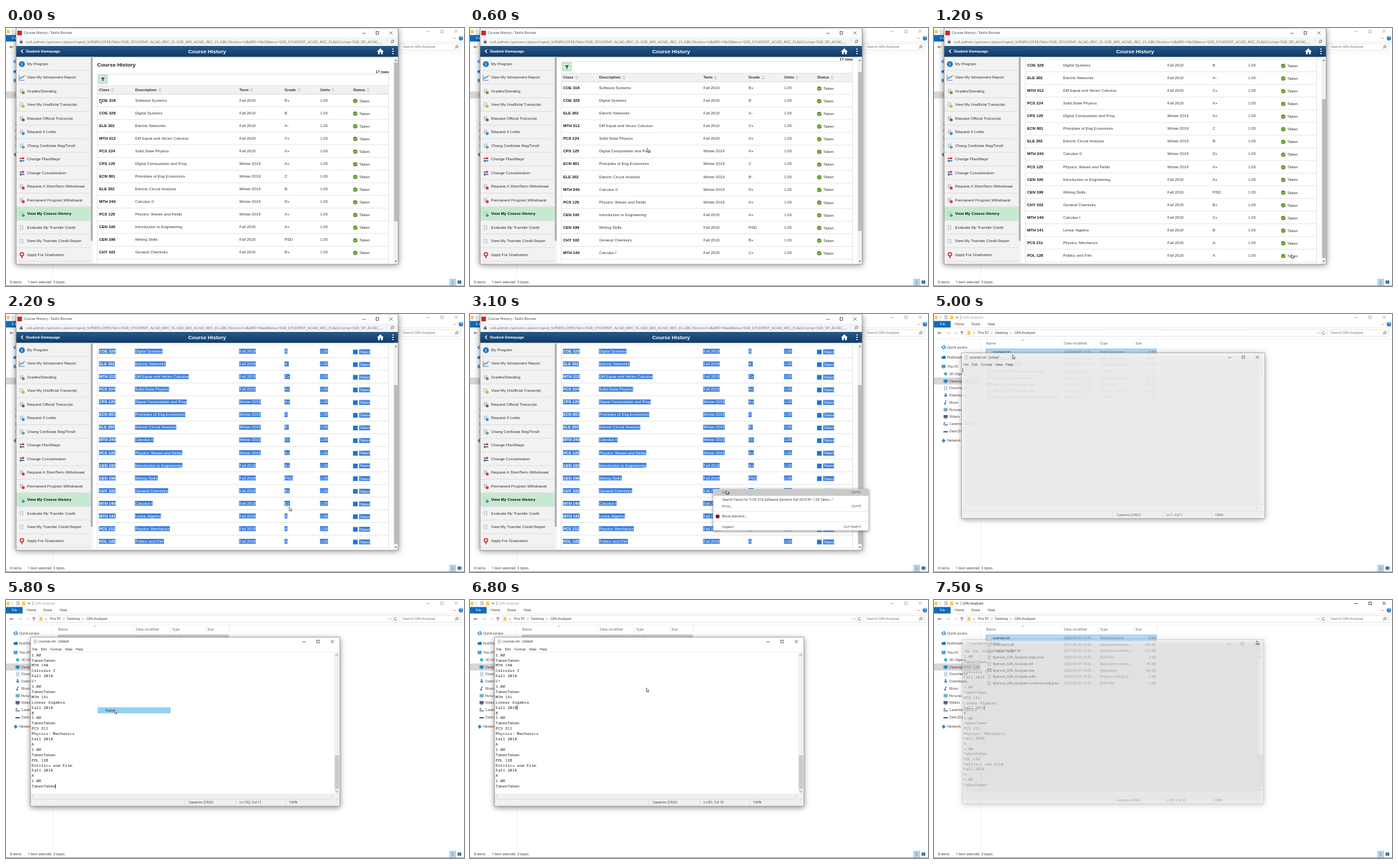
Recreate the animation shown at these times as an HTML page with a canvas. Size 690 px wide and 388 px high, loop 7600 ms.

```html
<!DOCTYPE html>
<html lang="en">
<head>
<meta charset="utf-8">
<title>Course export</title>
<style>
html, body { margin: 0; width: 100%; height: 100%; overflow: hidden; background: #fff; }
canvas { display: block; width: 690px; height: 388px; }
</style>
</head>
<body>
<canvas id="stage" width="690" height="388"></canvas>
<script>
const g = document.getElementById('stage').getContext('2d');
const LOOP = 7600, STEP = 100;
const UI = '"Open Sans", "Noto Sans", sans-serif';
const ARIAL = '"Liberation Sans", Arial, sans-serif';
const MONO = '"Noto Sans Mono", "DejaVu Sans Mono", monospace';

const courses = [
  'COE 318|Software Systems|Fall 2019|B+', 'COE 328|Digital Systems|Fall 2019|B',
  'ELE 302|Electric Networks|Fall 2019|A-', 'MTH 312|Diff Equat and Vector Calculus|Fall 2019|C+',
  'PCS 224|Solid State Physics|Fall 2019|A+', 'CPS 125|Digital Computation and Prog|Winter 2019|A+',
  'ECN 801|Principles of Eng Economics|Winter 2019|C', 'ELE 202|Electric Circuit Analysis|Winter 2019|B-',
  'MTH 240|Calculus II|Winter 2019|D+', 'PCS 125|Physics: Waves and Fields|Winter 2019|A+',
  'CEN 100|Introduction to Engineering|Fall 2018|A+', 'CEN 199|Writing Skills|Fall 2018|PSD',
  'CHY 102|General Chemistry|Fall 2018|B+', 'MTH 140|Calculus I|Fall 2018|C+',
  'MTH 141|Linear Algebra|Fall 2018|B', 'PCS 211|Physics: Mechanics|Fall 2018|A',
  'POL 128|Politics and Film|Fall 2018|A'
].map(s => s.split('|'));
const pasted = courses.flatMap(c => [...c, '1.00', 'TakenTaken']);

const clamp = v => Math.max(0, Math.min(1, v));
const ease = v => { v = clamp(v); return v * v * (3 - 2 * v); };
const span = (t, a, b) => ease((t - a) / (b - a));

function box(x, y, w, h, fill, stroke) {
  if (fill) { g.fillStyle = fill; g.fillRect(x, y, w, h); }
  if (stroke) {
    g.strokeStyle = stroke; g.lineWidth = 0.7;
    g.strokeRect(x + 0.35, y + 0.35, w - 0.7, h - 0.7);
  }
}
function disc(x, y, r, color) {
  g.fillStyle = color; g.beginPath(); g.arc(x, y, r, 0, 7); g.fill();
}
function line(points, color, width = 0.7) {
  g.strokeStyle = color; g.lineWidth = width;
  g.beginPath();
  for (let i = 0; i < points.length; i += 2) g.lineTo(points[i], points[i + 1]);
  g.stroke();
}
function shape(points, fill) {
  g.fillStyle = fill; g.beginPath();
  for (let i = 0; i < points.length; i += 2) g.lineTo(points[i], points[i + 1]);
  g.closePath(); g.fill();
}
// y is the middle of the capitals
function text(s, x, y, size = 5.1, color = '#333', family = UI, weight = '', align = 'left') {
  g.font = `${weight} ${size}px ${family}`;
  g.textAlign = align; g.fillStyle = color;
  g.fillText(s, x, y + size * 0.35);
}
function chevron(x, y, dx, dy, color = '#777') {
  if (dx) line([x - dx, y - 2, x + dx, y, x - dx, y + 2], color);
  else line([x - 2, y - dy, x, y + dy, x + 2, y - dy], color);
}
function lens(x, y, color) {
  g.strokeStyle = color; g.lineWidth = 0.8;
  g.beginPath(); g.arc(x + 0.6, y - 0.6, 1.8, 0, 7); g.stroke();
  line([x - 0.8, y + 0.8, x - 2.4, y + 2.4], color, 0.9);
}
function controls(xMin, xMax, xClose, y, color) {
  line([xMin - 2.5, y + 0.5, xMin + 2.5, y + 0.5], color);
  box(xMax - 2.3, y - 2.3, 4.6, 4.6, null, color);
  line([xClose - 2.3, y - 2.3, xClose + 2.3, y + 2.3], color);
  line([xClose - 2.3, y + 2.3, xClose + 2.3, y - 2.3], color);
}
function shadowBox(x, y, w, h, fill, blur, color) {
  g.save();
  g.shadowBlur = blur; g.shadowColor = color; g.shadowOffsetY = blur / 5;
  box(x, y, w, h, fill);
  g.restore();
}
function page(x, y, accent) {
  box(x - 2.3, y - 3, 4.8, 6, '#fff', '#a3a9b0');
  line([x - 1, y - 1, x + 1.3, y - 1], accent);
  line([x - 1, y + 0.8, x + 1.3, y + 0.8], accent);
}

const places = [
  ['Quick access', 20, 50, '#2b8be0'], ['NubStash', 20, 65, '#1479d0'], ['This PC', 20, 79, '#3a9be0'],
  ['3D Objects', 23, 90, '#35b4d2'], ['Desktop', 23, 101, '#1e88d8'], ['Documents', 23, 111.5, '#8a9cae'],
  ['Downloads', 23, 122, '#2f7fe0'], ['Music', 23, 133, '#2390e8'], ['Pictures', 23, 144, '#6fa8c8'],
  ['Videos', 23, 154.5, '#555b66'], ['Casemor-SSD (C:)', 23, 165.5, '#8c9299'],
  ['Data (D:)', 23, 176, '#666'], ['Network', 20, 190.5, '#2b90d8']
];
const files = [
  ['courses.txt', '2020-05-07 11:41 ...', 'Text Document', '0 KB'],
  ['LiveCharts.dll', '2017-06-20 12:26 ...', 'Application extens...', '149 KB'],
  ['LiveCharts.Wpf.dll', '2017-06-20 12:26 ...', 'Application extens...', '213 KB'],
  ['Ryerson_GPA_Analyzer.deps.json', '2020-05-07 10:42 ...', 'JSON File', '2 KB'],
  ['Ryerson_GPA_Analyzer.dll', '2020-05-07 10:42 ...', 'Application extens...', '85 KB'],
  ['Ryerson_GPA_Analyzer.exe', '2020-05-07 10:42 ...', 'Application', '168 KB'],
  ['Ryerson_GPA_Analyzer.pdb', '2020-05-07 10:42 ...', 'Program Debug D...', '6 KB'],
  ['Ryerson_GPA_Analyzer.runtimeconfig.json', '2020-05-07 10:41 ...', 'JSON File', '1 KB']
];

function placeIcon(i, x, y, c) {
  if (i === 1) { disc(x - 1.4, y + 0.5, 1.9, c); disc(x + 1, y, 2.3, c); box(x - 2, y, 5, 2.3, c); }
  else if (i === 0) line([x - 3, y, x + 1, y - 2.5, x + 3, y + 1, x - 1, y + 2, x - 3, y], c, 1.4);
  else if (i === 6) { box(x - 1, y - 3, 2, 3, c); shape([x - 3, y, x + 3, y, x, y + 3], c); }
  else if (i === 7) { disc(x - 1, y + 1.8, 1.5, c); line([x, y + 2, x, y - 3, x + 2, y - 1], c, 1); }
  else if (i === 5) page(x, y, c);
  else if (i === 10 || i === 11) { box(x - 3.2, y, 6.4, 2.2, c); if (i === 10) box(x - 3, y - 3, 2.4, 2.4, '#35a4e8'); }
  else if (i === 3 || i === 12) shape([x, y - 3.2, x + 3, y, x, y + 3.2, x - 3, y], c);
  else { box(x - 3, y - 2.5, 6, 4.4, c); line([x - 1.6, y + 2.8, x + 1.6, y + 2.8], c); }
}

function explorer(t) {
  const active = t >= 7400 || (t >= 4700 && t < 4900);
  const ink = active ? '#111' : '#999';
  box(0, 0, 690, 388, '#fff');
  box(1, 2.5, 4.5, 5.5, '#f5cb5c');
  line([9.5, 2, 9.5, 8], '#aaa');
  page(18, 5, '#d05050');
  box(24, 2.5, 5, 5.5, '#f5cb5c');
  shape([33, 4.5, 36.4, 4.5, 34.7, 6.5], '#444');
  line([40.5, 2, 40.5, 8], '#888');
  text('GPA-Analyzer', 43, 5, 5.1, ink);
  controls(636, 657, 678, 5, ink);
  box(0, 10.5, 25, 10, '#0d6cbd');
  text('File', 8.5, 15.5, 5.1, '#fff');
  text('Home', 31, 15.5); text('Share', 56, 15.5); text('View', 81, 15.5);
  chevron(676, 15.5, 0, 1);
  disc(685.3, 15.5, 3.2, '#1679cf');
  text('?', 685.3, 15.5, 4.8, '#fff', UI, 'bold', 'center');
  line([0, 20.8, 690, 20.8], '#e2e2e2');

  line([11, 28.5, 6, 28.5], '#333'); line([8, 26.5, 6, 28.5, 8, 30.5], '#333');
  line([19, 28.5, 24, 28.5], '#bbb'); line([22, 26.5, 24, 28.5, 22, 30.5], '#bbb');
  chevron(33, 28.5, 0, 1, '#999');
  line([42, 31, 42, 26], '#333'); line([40, 28, 42, 26, 44, 28], '#333');
  box(48, 23, 545, 11, null, '#dcdcdc');
  box(50.5, 25.5, 4.5, 6, '#f5cb5c');
  chevron(60, 28.5, 0.8, 0); text('This PC', 65.5, 28.5);
  chevron(87, 28.5, 0.8, 0); text('Desktop', 92, 28.5);
  chevron(116, 28.5, 0.8, 0); text('GPA-Analyzer', 121, 28.5, 5.2);
  chevron(579, 28.5, 0, 1);
  line([582.7, 23, 582.7, 34], '#dcdcdc');
  g.strokeStyle = '#555'; g.lineWidth = 0.7;
  g.beginPath(); g.arc(587, 28.5, 2.2, 0, 5.2); g.stroke();
  box(595, 23, 91, 11, null, '#dcdcdc');
  text('Search GPA-Analyzer', 598, 28.5, 5.1, '#707070');
  lens(679, 28.5, '#555');
  line([0, 37.5, 690, 37.5], '#eee');

  box(0, 95.5, 69.5, 10.5, '#d6d6d6');
  places.forEach(([name, x, y, c], i) => {
    placeIcon(i, x === 20 ? 14.5 : 17.5, y, c);
    text(name, x, y);
  });
  line([70.5, 38, 70.5, 376], '#ececec');

  chevron(134, 39.5, 0, -0.7, '#999');
  [['Name', 78.5], ['Date modified', 196], ['Type', 250], ['Size', 303.5]]
    .forEach(([s, x]) => text(s, x, 44, 5.2, '#4c607a'));
  [193, 247, 301, 336].forEach(x => line([x, 39, x, 49], '#e3e3e3'));
  const hot = t >= 4700 && t < 5100 || t >= 7400;
  box(78, 52.3, 257.5, 9.7, hot ? '#b5dcfa' : '#d3d3d3', hot ? '#7fbdea' : '#c4c4c4');
  files.forEach(([name, date, type, size], i) => {
    const y = 57.3 + i * 9.7;
    if (i === 5) { box(80, y - 2.5, 6.5, 5, '#2d79bd'); box(81, y - 0.8, 4.5, 2.3, '#e8f2fa'); }
    else page(83, y, i === 3 || i === 7 ? '#2d8ad0' : '#9fb3c6');
    text(name, 88.5, y, 5.05, '#222');
    text(date, 196, y, 5.1, '#777');
    text(type, 250, y, 5.1, '#777');
    text(size, 334, y, 5.1, '#777', UI, '', 'right');
  });

  text('8 items', 6, 382.3); text('1 item selected', 32.5, 382.3); text('0 bytes', 71.5, 382.3);
  box(668, 377.5, 10, 9.5, '#cbe6f8', '#7db8e0');
  for (let i = 0; i < 3; i++) line([670.5, 380 + i * 2.2, 675.5, 380 + i * 2.2], '#567');
  box(680.5, 379.8, 5.5, 4.6, '#3d7fb5', '#567');
  line([0, 387.6, 690, 387.6], '#777');
}

const links = ['My Program', 'View My Advisement Report', 'Grades/Standing', 'View My Unofficial Transcript',
  'Request Official Transcript', 'Request A Letter', 'Chang Certficate Reg/Trnsfr', 'Change Plan/Major',
  'Change Concentration', 'Request A ShortTerm Withdrawal', 'Permanent Program Withdrawal',
  'View My Course History', 'Evaluate My Transfer Credit', 'View My Transfer Credit Report',
  'Apply For Graduation'];
const tints = ['#1d78bf', '#3b82c4', '#5f9f3a', '#e2a92c', '#4a6f9a', '#2f8fd0', '#7a9a86', '', '',
  '#c8403a', '#c8403a', '#3a9c98', '#b5bcc4', '#b5bcc4', '#c9352c'];

function linkIcon(i, y) {
  const x = 24, c = tints[i];
  if (i === 0) {
    disc(x, y, 4.4, c);
    text('i', x, y, 6.5, '#fff', ARIAL, 'bold', 'center');
  } else if (i === 1) {
    line([x - 4, y - 4, x - 4, y + 4, x + 4, y + 4], '#667', 0.8);
    line([x - 3, y + 2, x - 1, y - 1, x + 1, y, x + 4, y - 4], c, 1.2);
  } else if (i === 7 || i === 8) {
    box(x - 3.5, y - 2.5, 5, 1.6, '#c9352c'); shape([x + 1, y - 4, x + 4, y - 1.7, x + 1, y + 0.4], '#c9352c');
    box(x - 1.5, y + 1.2, 5, 1.6, '#2d70b8'); shape([x - 1, y - 0.2, x - 4, y + 2, x - 1, y + 4.2], '#2d70b8');
  } else if (i === 14) {
    g.strokeStyle = c; g.lineWidth = 1.6;
    g.beginPath(); g.arc(x, y - 1, 2.6, 0, 7); g.stroke();
    box(x - 0.8, y + 2, 1.6, 3, c);
  } else {
    page(x - 0.8, y - 0.5, c);
    if (i < 12) disc(x + 2, y + 2, 2.2, c);
  }
}

function courseTable(scroll, selected) {
  g.save();
  g.beginPath(); g.rect(131, 43.5, 453, 310.5); g.clip();
  g.translate(0, -scroll);
  text('Course History', 137.3, 55, 8.1, '#222', ARIAL, 'bold');
  text('17 rows', 577, 66, 5.4, '#222', ARIAL, 'bold', 'right');
  box(137, 69, 440, 360, null, '#d9d9d9');
  box(139, 70.5, 14, 13, '#cdebd6', '#9ccbad');
  shape([143, 74.8, 149, 74.8, 146.6, 77.5, 146.6, 80.5, 145.4, 79.8, 145.4, 77.5], '#333');
  box(137.5, 86.5, 439, 13, '#f1f1f1');
  line([137, 86.5, 577, 86.5], '#ddd');
  [['Class', 140, 160.5], ['Description', 194.5, 232], ['Term', 351.5, 370], ['Grade', 419.5, 441.5],
    ['Units', 473.5, 492.5], ['Status', 523, 545.5]].forEach(([s, x, d]) => {
    text(s, x, 93, 5.9, '#333', ARIAL, 'bold');
    line([d - 1.8, 92.6, d, 90.6, d + 1.8, 92.6], '#888', 0.6);
    line([d - 1.8, 93.6, d, 95.6, d + 1.8, 93.6], '#888', 0.6);
  });
  line([137, 99.5, 577, 99.5], '#cfcfcf');
  courses.forEach((c, i) => {
    const y = 108.6 + i * 19.06;
    const cell = (s, x, weight, dy = 0) => {
      const size = weight ? 6.05 : 5.95;
      if (selected) {
        g.font = `${weight} ${size}px ${ARIAL}`;
        box(x - 0.3, y - 3.7 + dy, g.measureText(s).width + 0.6, 7.4, '#3b7edb');
      }
      text(s, x, y + dy, size, selected ? '#fff' : weight ? '#111' : '#3a3a3a', ARIAL, weight);
    };
    cell(c[0], 140.2, 'bold');
    cell(c[1], 194.5, '');
    cell(c[2], 351.5, '');
    cell(c[3], 419.8, '');
    cell('1.00', 473.3, '');
    if (selected) box(522.8, y - 2.4, 7, 7, '#1f74cf');
    else {
      disc(526.2, y + 1, 3.2, '#5c8f1d');
      line([524.6, y + 1, 525.8, y + 2.2, 527.9, y - 0.4], '#fff', 0.8);
    }
    cell('Taken', 532.3, '', 0.9);
    line([137, y + 9.8, 577, y + 9.8], '#dcdcdc');
  });
  g.restore();
}

function browser(t) {
  const scroll = 71.7 * span(t, 400, 1000);
  const selected = t >= 1800;
  shadowBox(15, 0, 576, 355.5, '#fff', 9, 'rgba(0,0,0,.5)');
  box(17, 4, 7, 7, '#d9222a');
  text('Course History - Tavilo Bronze', 27, 7.5, 5.2, '#333');
  controls(539, 559.5, 580, 7.5, '#333');
  box(15, 14, 576, 13, '#f3f4f5');
  box(20.8, 19.7, 4.2, 3.4, '#666');
  g.strokeStyle = '#666'; g.lineWidth = 0.7;
  g.beginPath(); g.arc(22.9, 19.5, 1.3, 3.14, 6.28); g.stroke();
  text('cs9.admin.ryerson.ca/psc/csprd_5/EMPLOYEE/SA/c/SSR_STUDENT_ACAD_REC_FL.SSR_MD_ACAD_REC_FL.GBL?Action=U&MD=Y&GMenu=SSR_STUDENT_ACAD_REC_FL&GComp=SSR_SP_ACAD_...',
    30, 20.5, 6.05, '#666');
  lens(582, 20.5, '#555');

  const blue = g.createLinearGradient(0, 27, 0, 43.5);
  blue.addColorStop(0, '#24598c'); blue.addColorStop(1, '#123a63');
  box(15, 27, 576, 16.5, blue);
  line([25.5, 32.5, 23, 35, 25.5, 37.5], '#fff', 1.1);
  text('Student Homepage', 30, 35, 5.65, '#fff', ARIAL, 'bold');
  text('Course History', 303, 35, 7.95, '#fff', ARIAL, 'bold', 'center');
  shape([558.8, 35.5, 564, 30.5, 569.2, 35.5], '#fff');
  shape([560.4, 34.5, 567.6, 34.5, 567.6, 39.4, 565, 39.4, 565, 36.5, 563, 36.5, 563, 39.4, 560.4, 39.4], '#fff');
  for (let i = -1; i < 2; i++) disc(583, 35 + i * 3.4, 1, '#fff');

  g.save();
  g.beginPath(); g.rect(15, 43.5, 116, 311); g.clip();
  box(15, 43.5, 116, 311, '#f2f2f2');
  links.forEach((s, i) => {
    const y = 53.6 + i * 20.5, on = i === 11;
    if (on) box(15, y - 10.2, 112.5, 20.4, '#c7e9d0');
    line([15, y + 10.3, 127.5, y + 10.3], '#d6d6d6');
    linkIcon(i, y + 0.7);
    text(s, 31.8, y, 5.87, on ? '#111' : '#333', ARIAL, on ? 'bold' : '');
  });
  box(127.5, 43.5, 3.5, 311, '#f4f4f4');
  box(127.8, 44, 2.6, 276, '#a9a9a9');
  g.restore();

  courseTable(scroll, selected);
  box(584, 43.5, 6.5, 311, '#f1f1f1');
  box(584.5, 52 + scroll * 0.765, 5.5, 239, '#bcbcbc');
  shape([585.6, 49.6, 588.8, 49.6, 587.2, 47.6], '#555');
  shape([585.6, 350, 588.8, 350, 587.2, 352], '#555');
  g.strokeStyle = '#8b8b8b'; g.lineWidth = 0.8;
  g.strokeRect(15.2, 0, 575.6, 355.2);

  if (t >= 2500 && t < 3300) pageMenu(t);
}

function pageMenu(t) {
  shadowBox(366, 263, 235, 63, '#fff', 4, 'rgba(0,0,0,.45)');
  box(366, 263, 235, 63, null, '#bdbdbd');
  const over = t >= 2700;
  if (over) box(367, 264, 233, 9.5, '#c9c9c9');
  const item = (s, y, key) => {
    text(s, 380, y);
    if (key) text(key, 589, y, 5.1, '#444', UI, '', 'right');
  };
  item('Copy', 268.7, 'Ctrl+C');
  item('Search Tavilo for “COE 318 Software Systems Fall 2019 B+ 1.00 Taken...”', 279);
  item('Print...', 289.5, 'Ctrl+P');
  line([367, 297, 600, 297], '#e0e0e0');
  disc(373, 304.5, 3, '#8c1420');
  item('Block element...', 304.5);
  line([367, 312.3, 600, 312.3], '#e0e0e0');
  item('Inspect', 320, 'Ctrl+Shift+I');
}

const editItems = [['Undo', 133], ['Cut', 146], ['Copy', 156], ['Paste', 166], ['Delete', 176], ['Select All', 189],
  ['Right to left Reading order', 202], ['Show Unicode control characters', 212],
  ['Insert Unicode control character', 222], ['Open IME', 235], ['Reconversion', 245]];

function editMenu(t) {
  if (t >= 5400 && t < 5800) {
    shadowBox(137, 127, 112, 124, '#f2f2f2', 4, 'rgba(0,0,0,.4)');
    box(137, 127, 112, 124, null, '#c2c2c2');
    if (t >= 5600) box(138, 161.3, 110, 9.2, '#91d0f3');
    editItems.forEach(([s, y], i) => text(s, 150, y, 5.1, /^(0|1|2|4|10)$/.test(i) ? '#aaa' : '#222'));
    [139.5, 182.5, 195.5, 228.5].forEach(y => line([139, y, 247, y], '#d8d8d8'));
  } else if (t >= 5800 && t < 6000) {
    g.globalAlpha = t < 5900 ? 1 : 0.4;
    box(138, 161.3, 110, 9.2, '#94d0f2');
    text('Paste', 150, 166, 5.1, '#222');
    g.globalAlpha = 1;
  }
}

function editor(t) {
  const opening = clamp((t - 4850) / 200), closing = clamp((t - 7440) / 100);
  const full = t >= 5700, clicked = t >= 6100;
  const scale = 0.92 + 0.08 * opening - 0.045 * closing;
  g.save();
  g.globalAlpha = (0.2 + 0.8 * opening) * (1 - closing);
  g.translate(270, 183); g.scale(scale, scale); g.translate(-270, -183);
  shadowBox(37, 56, 466, 254, '#fff', 8, 'rgba(0,0,0,.5)');
  page(44, 62.5, '#4aa3cf');
  text('courses.txt - Jotleaf', 49, 62.5, 5.1, '#222');
  controls(449, 470, 491.5, 62.5, '#333');
  [['File', 39.5], ['Edit', 52.5], ['Format', 67], ['View', 89], ['Help', 105]]
    .forEach(([s, x]) => text(s, x, 74, 5.1, '#222'));
  line([37, 78.5, 503, 78.5], '#eee');

  const top = 82.6, pitch = 7.9;
  if (full) pasted.slice(-26).forEach((s, i) => text(s, 38.6, top + i * pitch, 5.97, '#222', MONO));
  const row = !full ? 0 : clicked ? 10 : 25, col = !full ? 0 : clicked ? 9 : 10;
  line([38.8 + col * 3.58, top + row * pitch - 3.4, 38.8 + col * 3.58, top + row * pitch + 3.6], '#111', 0.8);

  box(495, 79, 7, 212, '#f0f0f0');
  if (full) box(495.3, 233.5, 6.5, 50.5, '#cbcbcb');
  chevron(498.5, 82.5, 0, -0.9, full ? '#555' : '#bbb');
  chevron(498.5, 288, 0, 0.9, full ? '#555' : '#bbb');
  box(37.5, 291, 465, 8, '#f0f0f0');
  chevron(40.5, 295, -0.8, 0, '#bbb');
  chevron(490.5, 295, 0.8, 0, '#bbb');
  box(37.5, 299, 465, 10.5, '#f0f0f0');
  line([37.5, 299.3, 502.5, 299.3], '#d8d8d8');
  [269, 347, 421].forEach(x => line([x, 300, x, 309], '#d5d5d5'));
  text('Casemor (CRLF)', 275, 304.5);
  text(!full ? 'Ln 1, Col 1' : clicked ? 'Ln 87, Col 10' : 'Ln 102, Col 11', 352, 304.5);
  text('100%', 426, 304.5);
  g.strokeStyle = '#8f8f8f'; g.lineWidth = 0.7;
  g.strokeRect(37, 56, 466, 254);
  g.restore();
  editMenu(t);
}

// time, x, y of the pointer tip
const path = [
  [0, 141, 107], [300, 141, 107], [1100, 538.5, 340.5], [1900, 538.5, 340.5], [2400, 366, 263],
  [2600, 366, 263], [2900, 386, 265.5], [3200, 386, 265.5], [3700, 632.5, 214.5], [3900, 632.5, 214.5],
  [4600, 118.3, 61.5], [5100, 118.3, 61.5], [5350, 137, 127], [5400, 137, 127], [5600, 163.5, 165],
  [6500, 163.5, 165], [7300, 486.3, 61.3], [7600, 486.3, 61.3]
];
function pointer(t) {
  const i = Math.max(1, path.findIndex(p => p[0] > t));
  const [a, x0, y0] = path[i - 1], [b, x1, y1] = path[i];
  const k = span(t, a, b);
  g.save();
  g.translate(x0 + (x1 - x0) * k, y0 + (y1 - y0) * k);
  const arrow = [0, 0, 0, 5.7, 1.3, 4.5, 2.2, 6.6, 3.2, 6.2, 2.3, 4.2, 4.1, 4.1];
  shape(arrow, '#fff');
  line([...arrow, 0, 0], '#222', 0.6);
  g.restore();
}

function draw(t) {
  explorer(t);
  if (t < 3700) browser(t);
  if (t >= 4900 && t < 7550) editor(t);
  pointer(t);
}

const start = performance.now();
function tick() {
  const t = (performance.now() - start) % LOOP;
  draw(Math.floor(t / STEP) * STEP);
  requestAnimationFrame(tick);
}
tick();
</script>
</body>
</html>
```
